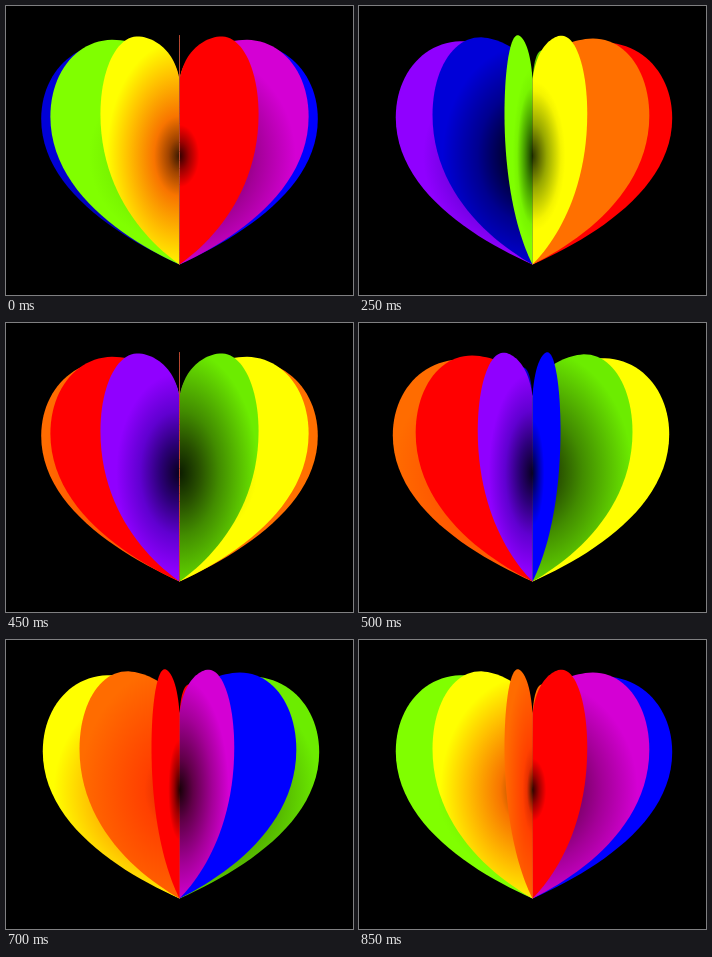
These frames come from a looping animation (347 px wide and 289 px high, 900 ms). An HTML page with a canvas:

```html
<!DOCTYPE html>
<html lang="en">
<head>
<meta charset="utf-8">
<title>Turning paper heart</title>
<style>
html, body { margin: 0; width: 100%; height: 100%; overflow: hidden; background: #000; }
canvas { display: block; }
</style>
</head>
<body>
<canvas id="stage" width="347" height="289"></canvas>
<script>
const ctx = document.getElementById('stage').getContext('2d');
const CX = 173.5, CY = 144.5, RADIUS = 138.3, CAMERA = 955;
const SHADE_Y = 150, SHADE_HEIGHT = 125;
const LEAVES = 12, STEP_MS = 50, STEPS = 18, STEP_DEG = 10;

// Colours from the middle of the spine (0) to the outer edge (1), for leaves on each side.
const papers = [
  { // orange
    left: [[0, '#401400'], [.2, '#e83000'], [.35, '#ff4000'], [1, '#ff6c00']],
    right: [[0, '#401c00'], [.2, '#c85800'], [.4, '#ff7000'], [1, '#ff7000']]
  },
  { // red
    left: [[0, '#280000'], [.2, '#a00000'], [.4, '#ff0000'], [1, '#ff0000']],
    right: [[0, '#300000'], [.12, '#a00000'], [.25, '#ff0000'], [1, '#ff0000']]
  },
  { // violet
    left: [[0, '#080020'], [.25, '#2c0078'], [.5, '#6000d0'], [.8, '#9000ff'], [1, '#9000ff']],
    right: [[0, '#180008'], [.25, '#600048'], [.6, '#a40098'], [.9, '#d400d4'], [1, '#d400d4']]
  },
  { // blue
    left: [[0, '#000000'], [.25, '#000030'], [.55, '#000090'], [.9, '#0000d8'], [1, '#0000d8']],
    right: [[0, '#000030'], [.22, '#0000a8'], [.42, '#0000ff'], [1, '#0000ff']]
  },
  { // green
    left: [[0, '#143000'], [.3, '#48a000'], [.55, '#78f400'], [.7, '#80ff00'], [1, '#80ff00']],
    right: [[0, '#0c1c00'], [.25, '#284f00'], [.5, '#428c00'], [1, '#6cec00']]
  },
  { // yellow
    left: [[0, '#381800'], [.14, '#a04400'], [.32, '#f87400'], [.65, '#ffc000'], [.92, '#ffff00'], [1, '#ffff00']],
    right: [[0, '#283400'], [.26, '#98a800'], [.52, '#f4f400'], [.6, '#ffff00'], [1, '#ffff00']]
  }
];

// Half a heart: distance from the spine and height on the stage.
const curves = [
  [[0, 74], [8, 50], [37, 38], [70, 38]],
  [[70, 38], [110, 38], [RADIUS, 71], [RADIUS, 113]],
  [[RADIUS, 113], [RADIUS, 181], [64, 229], [0, 258.5]]
];

function bezier([a, b, c, d], t) {
  const u = 1 - t;
  return [0, 1].map(i =>
    u * u * u * a[i] + 3 * u * u * t * b[i] + 3 * u * t * t * c[i] + t * t * t * d[i]);
}

const outline = curves.flatMap(curve =>
  Array.from({ length: 25 }, (_, i) => bezier(curve, i / 24)));

function project(r, y, angle) {
  const scale = CAMERA / (CAMERA - r * Math.cos(angle));
  return [CX + r * Math.sin(angle) * scale, CY + (y - CY) * scale];
}

function drawLeaf({ paper, angle }) {
  const side = Math.sin(angle);
  ctx.beginPath();
  for (const [r, y] of outline) ctx.lineTo(...project(r, y, angle));
  if (Math.abs(side) < .01) {
    ctx.strokeStyle = '#b84830';
    ctx.lineWidth = 1;
    ctx.stroke();
    return;
  }
  const [edge] = project(RADIUS, CY, angle);
  const shade = ctx.createRadialGradient(0, 0, 0, 0, 0, 1);
  for (const [at, colour] of side > 0 ? paper.right : paper.left) shade.addColorStop(at, colour);
  ctx.closePath();
  ctx.save();
  ctx.translate(CX, SHADE_Y);
  ctx.scale(edge - CX, SHADE_HEIGHT);
  ctx.fillStyle = shade;
  ctx.fill();
  ctx.restore();
}

function draw(step) {
  ctx.fillStyle = '#000';
  ctx.fillRect(0, 0, 347, 289);
  Array.from({ length: LEAVES }, (_, k) => ({
    paper: papers[k % papers.length],
    angle: (k * 360 / LEAVES + step * STEP_DEG) * Math.PI / 180
  }))
    .sort((a, b) => Math.cos(a.angle) - Math.cos(b.angle))
    .forEach(drawLeaf);
}

const start = performance.now();
function tick() {
  draw(Math.floor((performance.now() - start) / STEP_MS) % STEPS);
  requestAnimationFrame(tick);
}
tick();
</script>
</body>
</html>
```
